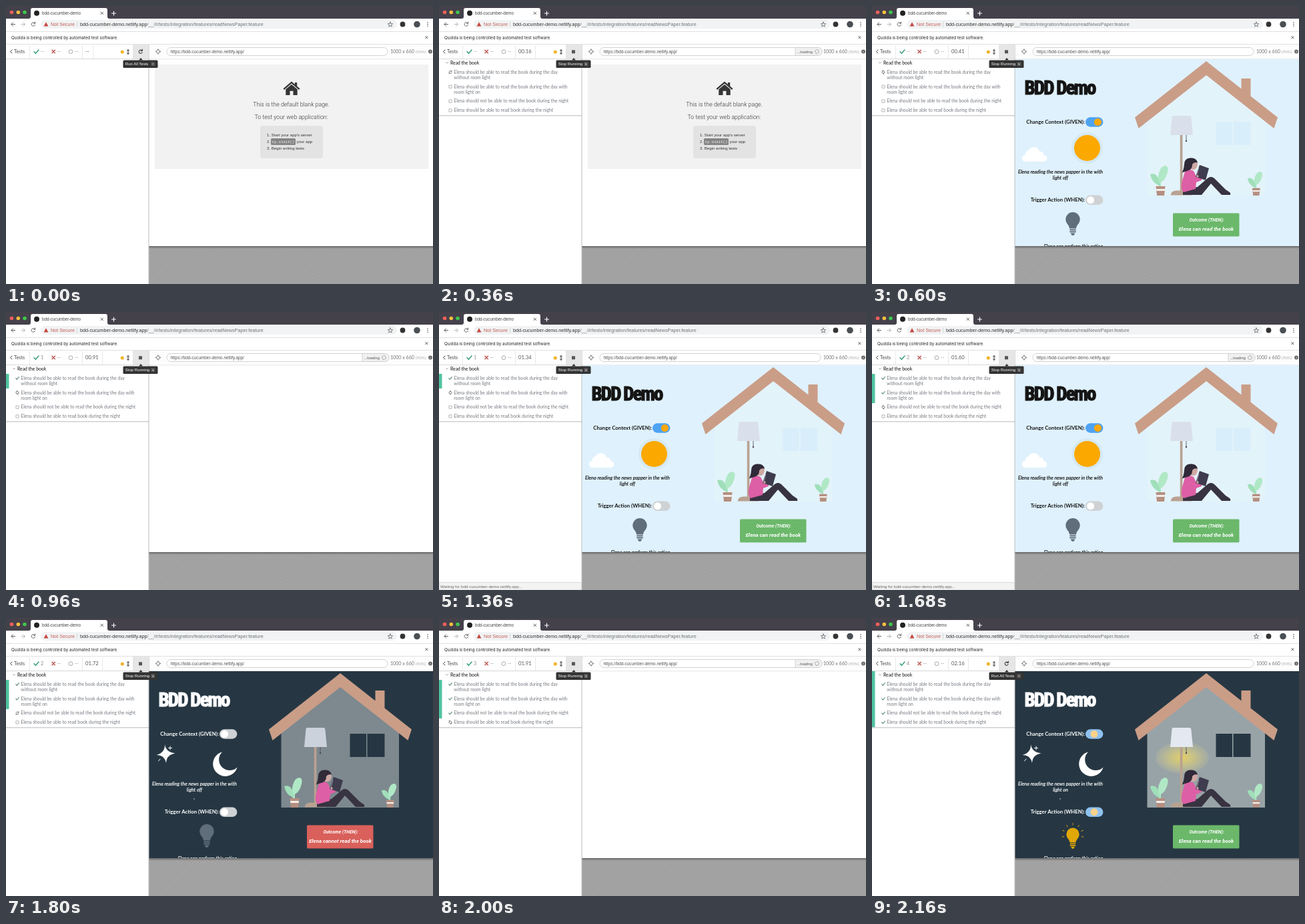
An HTML page for the animation above (2.2 s loop, 640 by 418 pixels).

```html
<!DOCTYPE html>
<html lang="en">
<head>
<meta charset="utf-8">
<title>Test run</title>
<style>
html, body { margin: 0; width: 100%; height: 100%; overflow: hidden; background: #fff; }
svg { display: block; width: 640px; height: 418px; font-family: "Liberation Sans", Arial, sans-serif; }
text { white-space: pre; }
.ui { font-family: Lato, "Open Sans", sans-serif; }
.line { fill: none; stroke-linecap: round; stroke-linejoin: round; }
.mid { text-anchor: middle; }
.hide { display: none; }

#scene { --sky: #dff1fc; --wall: #e3f3fa; --pane: #d9eefb; --ink: #151515; --bulb: #606e7b; --shade: #dae0eb; }
#scene.lit { --wall: #eef8f9; --pane: #d8effd; --bulb: #e0a806; }
#scene.night { --sky: #263743; --wall: #7d898f; --pane: #263743; --ink: #fff; --shade: #cbd2dc; }
#scene.night.lit { --wall: #98a3a7; --shade: #e4e8f0; }
#scene .glow, #scene .rays, #scene .moon { display: none; }
#scene.lit .glow, #scene.lit .rays, #scene.night .moon { display: inline; }
#scene.night .sun { display: none; }
#scene.lit .bulb { transform: translate(301px, 347px) scale(.9) translate(-301px, -345px); }
.ink { fill: var(--ink); }
.label { font: 700 7.8px Lato, "Open Sans", sans-serif; text-anchor: end; }
.note { font: italic 500 7.3px Lato, "Open Sans", sans-serif; text-anchor: middle; stroke: var(--ink); stroke-width: .12; }
.title { font-family: "Roboto Condensed", Roboto, "Open Sans", sans-serif; font-weight: 900; font-stretch: 75%; letter-spacing: -.065em; stroke: var(--ink); stroke-width: 1.2; }
.out { font-family: Roboto, "Open Sans", sans-serif; font-style: italic; font-weight: 700; fill: #fff; text-anchor: middle; }

.toggle .track { fill: #cfd2d4; }
.toggle .knob { fill: #fff; transform: translateX(327.6px); }
.toggle.on .track { fill: #4ea3f2; }
.toggle.on .knob { fill: #fba80a; transform: translateX(338.4px); }
.toggle.half .track { fill: #8fc2f0; }
.toggle.half .knob { fill: #fcd28b; transform: translateX(333px); }
</style>
</head>
<body>
<svg viewBox="0 0 640 418">
  <defs>
    <pattern id="hatch" width="4" height="4" patternUnits="userSpaceOnUse" patternTransform="rotate(45)">
      <rect width="4" height="4" fill="#a4a4a4"/><rect width="1" height="4" fill="#9d9d9d"/>
    </pattern>
    <linearGradient id="drop" x2="0" y2="1">
      <stop stop-color="#000" stop-opacity=".38"/><stop offset="1" stop-color="#000" stop-opacity="0"/>
    </linearGradient>
    <radialGradient id="light">
      <stop stop-color="#f0d65c" stop-opacity=".85"/><stop offset=".5" stop-color="#ecd96e" stop-opacity=".5"/>
      <stop offset="1" stop-color="#e9dd86" stop-opacity=".1"/>
    </radialGradient>
    <clipPath id="view"><rect x="214" y="80" width="426" height="281"/></clipPath>
    <path id="tick" class="line" d="M-2.3 .1-.7 1.8 2.4-1.8" stroke-width="1.1"/>
    <path id="spin" class="line" stroke="#666" stroke-width=".8" d="M-2-.5A2.1 2.1 0 0 1 1.8-1.1M2 .5A2.1 2.1 0 0 1-1.8 1.1M2-2.2V-.9H.8M-2 2.2V.9h1.2"/>
  </defs>
  <rect width="640" height="418" fill="#fff"/>

  <!-- browser window -->
  <rect width="640" height="19" fill="#44414b"/>
  <circle cx="8.5" cy="9.5" r="2.8" fill="#f3605a"/><circle cx="18.3" cy="9.5" r="2.8" fill="#f5bd40"/><circle cx="28" cy="9.5" r="2.8" fill="#3fc64c"/>
  <path d="M34 19q3 0 3-3V6q0-3 3-3h109q3 0 3 3v10q0 3 3 3z" fill="#fff"/>
  <circle cx="46" cy="10.8" r="4" fill="#222"/>
  <text x="54" y="13.2" font-size="6.3" fill="#444">bdd-cucumber-demo</text>
  <path class="line" d="M142 9l3.6 3.6m0-3.6-3.6 3.6" stroke="#555" stroke-width=".9"/>
  <path class="line" d="M158.5 11h6m-3-3v6" stroke="#fff" stroke-width="1.1"/>
  <g class="line" stroke="#5f6368" stroke-width="1">
    <path d="M13.5 27.5H8m2.6-2.7L8 27.5l2.6 2.7"/>
    <path d="M23 27.5h5.5m-2.6-2.7 2.6 2.7-2.6 2.7" stroke="#b9b9b9"/>
    <path d="M43.3 26a2.8 2.8 0 1 0 .2 2.5M43.6 24v2.2h-2.2"/>
  </g>
  <rect x="52" y="21" width="534" height="13" rx="6.5" fill="#f1f3f4"/>
  <path d="M60 24.3 63.4 30.5H56.6z" fill="#c5483f"/>
  <text x="67" y="30.2" font-size="7.2" fill="#c25b54">Not Secure</text>
  <path d="M106.5 23.5v8" stroke="#ccc" stroke-width=".7"/>
  <text x="111" y="30.2" font-size="7.2" fill="#333">bdd-cucumber-demo.netlify.app<tspan fill="#707478">/__/#/tests/integration/features/readNewsPaper.feature</tspan></text>
  <path class="line" d="m576 24 1 2.5 2.6.2-2 1.7.7 2.6-2.3-1.4-2.3 1.4.7-2.6-2-1.7 2.6-.2z" stroke="#5f6368" stroke-width=".8"/>
  <circle cx="594.5" cy="27.5" r="3.9" fill="#333"/>
  <circle cx="616" cy="27.5" r="4.8" fill="#4a4f54"/>
  <g fill="#555"><circle cx="632" cy="24.7" r=".8"/><circle cx="632" cy="27.5" r=".8"/><circle cx="632" cy="30.3" r=".8"/></g>
  <path d="M0 38.5h640M0 57.5h640" stroke="#dadada" stroke-width=".8"/>
  <text x="8" y="49.5" font-size="6.2" font-family="Inter, sans-serif" fill="#222">Quolda is being controlled by automated test software.</text>
  <path class="line" d="m628.8 45.6 3.2 3.2m0-3.2-3.2 3.2" stroke="#444" stroke-width=".9"/>

  <!-- address row -->
  <rect x="214" y="58" width="426" height="22" fill="#fdfdfd"/>
  <g class="line" stroke="#777" stroke-width=".8"><circle cx="228" cy="68.5" r="2.7"/><path d="M228 64.5v2m0 4v2M224 68.5h2m4 0h2"/></g>
  <rect x="241" y="62.5" width="331" height="12" rx="6" fill="#fff" stroke="#c9c9c9" stroke-width=".8"/>
  <text x="246.5" y="70.7" font-size="6.4" fill="#555">https://bdd-cucumber-demo.netlify.app/</text>
  <g id="loading">
    <path d="M534 62.5h34.5a5.8 6 0 0 1 0 12H534z" fill="#f1f1f1" stroke="#c9c9c9" stroke-width=".8"/>
    <text x="536.5" y="70.7" font-size="5.8" fill="#555">...loading</text>
    <circle id="ring" cx="566.5" cy="68.5" r="2.8" fill="none" stroke="#777" stroke-width=".9" stroke-dasharray="1.3 .9"/>
  </g>
  <text class="ui" x="576" y="71" font-size="7.1" fill="#777">1000 x 660</text>
  <text class="ui" x="614" y="71" font-size="6.2" fill="#aaa">(90%)</text>
  <circle cx="636" cy="68.5" r="2.9" fill="#666"/><path d="M636 68v2m0-3.4v.5" stroke="#fff" stroke-width=".8"/>

  <!-- page -->
  <rect x="214" y="361" width="426" height="57" fill="url(#hatch)"/>
  <rect x="214" y="361" width="426" height="4" fill="url(#drop)"/>
  <path d="M214 79.8h426" stroke="#ddd" stroke-width=".7"/>
  <g id="blank">
    <rect x="223" y="88" width="410" height="157" fill="#f2f2f2"/>
    <path d="M428 113.5l-12.5 10.7 1.5 1.7 11-9.3 11 9.3 1.5-1.7-4.3-3.7v-5.5h-3.3v2.7zM428 118l-8.7 7.2v8.8h6.2v-6.3h5v6.3h6.2v-8.8z" fill="#353535"/>
    <g class="mid" font-family="Roboto, sans-serif" font-weight="300" font-size="8.8" fill="#333">
      <text x="427.5" y="151">This is the default blank page.</text>
      <text x="427.5" y="170">To test your web application:</text>
    </g>
    <rect x="381" y="180" width="94" height="49" rx="4" fill="#e3e3e3"/>
    <g font-size="6.08" fill="#333">
      <text x="391" y="195.5">1. Start your app's server</text>
      <text x="391" y="206">2.</text><text x="435.5" y="206">your app</text>
      <text x="391" y="216.3">3. Begin writing tests</text>
    </g>
    <rect x="397" y="199" width="37" height="10" rx="1.5" fill="#858585"/>
    <text class="mid" x="415.5" y="205.8" font-family="Liberation Mono, monospace" font-size="5.6" fill="#fff">cy.visit()</text>
  </g>

  <g id="scene" clip-path="url(#view)">
    <rect x="214" y="80" width="426" height="281" fill="var(--sky)"/>
    <text id="heading" class="title ink" x="228.5" y="132.5">BDD Demo</text>
    <text class="label ink" x="319" y="177">Change Context (GIVEN):</text>
    <g class="toggle" id="given"><rect class="track" x="320" y="167.3" width="26.4" height="14.4" rx="7.2"/><circle class="knob" cy="174.5" r="5.5"/></g>
    <text class="label ink" x="319" y="294">Trigger Action (WHEN):</text>
    <g class="toggle" id="when"><rect class="track" x="320" y="284.6" width="26.4" height="14.4" rx="7.2"/><circle class="knob" cy="291.8" r="5.5"/></g>
    <g class="sun">
      <circle cx="322.5" cy="213.5" r="23.5" fill="#d5e9f3"/><circle cx="322.5" cy="213.5" r="19.5" fill="#fba800"/>
      <path d="M230 234a5 5 0 0 1-.5-10 7 7 0 0 1 5-7 9 9 0 0 1 16.5 1.5 6 6 0 0 1 6.5 5.5 5 5 0 0 1-.5 10z" fill="#fff"/>
    </g>
    <g class="moon" fill="#fff">
      <path d="M238 190q1.5 11.5 15.5 13.5-13 2-13.5 14.5-2.5-12-14.5-12 13-3.500 12.500-16z"/>
      <path class="line" d="M246 193v5m-2.500-2.500h5M231 212l-2.500 3" stroke="#fff" stroke-width="1"/>
      <path d="M324 201.500a18.500 18.500 0 1 0 22.500 23 16 16 0 0 1-22.500-23z"/>
      <circle cx="282" cy="272" r=".7"/>
    </g>
    <text class="note ink" x="282.5" y="252">Elena reading the news papper in the with</text>
    <text class="note ink" id="note" x="282.5" y="260.8"></text>
    <text class="note ink" x="302" y="363.5">Elena can perform this action</text>
    <g class="bulb" fill="var(--bulb)">
      <path d="M301 310a10.700 10.700 0 0 0-10.700 10.700c0 6.500 5.200 8 5.700 13.800h10c.5-5.800 5.700-7.300 5.700-13.800A10.700 10.700 0 0 0 301 310z"/>
      <path d="M296.300 335.500h9.400v2h-9.400zm0 3h9.400v2h-9.400zm1.700 3h6q-.5 3.500-3 3.500t-3-3.500z"/>
    </g>
    <g class="rays line" id="rays" stroke="#e0a806" stroke-width=".9"></g>

    <path d="M501 100 589 172V285H412.500V172z" fill="var(--wall)"/>
    <path d="M553.5 109h14v42l-14-11zM501 83 608 167.500 602.500 184 501 104 399.500 184 394 167.500z" fill="#ca9d87"/>
    <path d="M515.5 174h24.500v35h-24.500zm26 0h26v35h-26z" fill="var(--pane)"/>
    <ellipse class="glow" cx="465" cy="210" rx="40" ry="24" fill="url(#light)"/>
    <path d="M461.800 193h3.600v85h-3.600z" fill="#b9a191"/>
    <path d="M447.500 284.500q1-7 9-7h14q8 0 9 7z" fill="#b9a191"/>
    <path d="M471 193v10" stroke="#5b5262" stroke-width=".9"/><circle cx="471" cy="203" r="1.2" fill="#4a4252"/>
    <path d="M451 165h25q2 0 2.300 2l2.700 27h-34l2.500-27q.3-2 1.500-2z" fill="var(--shade)"/>
    <g id="plant">
      <path d="M430 271q-3-8 0-20 3-11 10-11 6 2 2 13-3 9-9 12v6z" fill="#b0e8c6"/>
      <path d="M430 270q-11-5-13-17 8-3 12 6 2 5 3 11z" fill="#a0dfba"/>
      <path d="M425.500 271h14l-1.500 14h-11z" fill="#b58f80"/><path d="M426 275h13l-.4 3h-12.200z" fill="#f4eeea"/>
    </g>
    <use href="#plant" transform="translate(212.5 56.4) scale(.84 .802)"/>

    <!-- reader -->
    <path d="M466 284v-7l22-5 15-13q5-4 10 0l17 17 6 4q2 2 1 4h-13l-16-17-14 17z" fill="#383341"/>
    <path d="M469 249q7-5 13-1l5 10 7 0v4l-8 3-1 10-18 5q-5-5-2-17z" fill="#dd5fa5"/>
    <path d="M478 235q9-4 10 2 0 7-5 9h-5z" fill="#cfa9a4"/>
    <path d="M468 238q0-9 9-9.500 9-1 11 7-6-1-8 3 0 7-6 9-3 1-9.500 3 3-5 3.500-12.500z" fill="#302a39"/>
    <path d="m491 239 14 5-5 18-15-5z" fill="#3e3c4e"/><path d="m490 243.500-3 12" stroke="#9793a6" stroke-width=".8"/>
    <circle cx="488" cy="256" r="1.700" fill="#cfa9a4"/>

    <rect id="outcome" x="451" y="311.500" width="99.500" height="35" rx="1.500"/>
    <text class="out" x="501.5" y="324" font-size="6.8">Outcome (THEN):</text>
    <text class="out" id="verdict" x="501" y="338" font-size="7.9"></text>
  </g>

  <!-- test runner panel -->
  <path d="M214 58v360" stroke="#bdbdbd" stroke-width="1"/>
  <rect y="58" width="213.500" height="21.500" fill="#fff"/>
  <rect x="190" y="58" width="24" height="21.500" fill="#e6e6e6"/>
  <path d="M0 79.600h214" stroke="#d2d2d2" stroke-width=".9"/>
  <path d="M35.500 59v20M114.500 59v20" stroke="#e2e2e2" stroke-width=".8"/>
  <path id="divider" d="M0 59v20" stroke="#e2e2e2" stroke-width=".8"/>
  <path class="line" d="M9 66l-2.500 2.500L9 71" stroke="#444" stroke-width="1"/>
  <g class="ui" font-size="7.3" fill="#8b8b8b">
    <text x="12" y="71.200" fill="#444">Tests</text>
    <use href="#tick" transform="translate(45.500 68.700) scale(1.450)" stroke="#3fa27c"/>
    <text id="passed" x="52" y="71.200"></text>
    <path class="line" d="m69 66.400 4.400 4.400m0-4.400-4.400 4.400" stroke="#c0605b" stroke-width="1.5"/>
    <text x="76.500" y="71.200">--</text>
    <circle cx="97" cy="68.700" r="2.900" fill="none" stroke="#aaa" stroke-width="1"/>
    <text x="103" y="71.200">--</text>
    <text id="clock" x="119" y="71.300" font-size="7.7" fill="#555"></text>
  </g>
  <circle cx="174.300" cy="69" r="2.600" fill="#f1b52f"/>
  <path class="line" d="M183 65.800v6.400m-1.400-5 1.400-1.600 1.400 1.600m-2.800 3.600 1.400 1.600 1.400-1.600" stroke="#333" stroke-width="1"/>
  <path id="stop" d="M199 66.300h5v5h-5z" fill="#555"/>
  <path id="rerun" class="line" d="M203.800 67a2.600 2.600 0 1 0 .3 2.800M204.400 65v2.400H202" stroke="#444" stroke-width="1.1"/>

  <g id="list">
    <rect y="164" width="214" height="2.500" fill="url(#drop)" opacity=".6"/>
    <path class="line" d="m10.600 84.700 1.400 1.400 1.400-1.400" stroke="#777" stroke-width=".7"/>
    <text class="ui" x="17" y="88" font-size="6.8" font-weight="500" fill="#222">Read the book</text>
    <g id="rows" class="ui" font-size="6.75" fill="#757a80"></g>
    <rect id="bar" width="4.500" fill="#4fc3a0"/>
  </g>

  <g id="tip">
    <path d="m202 78 3 3.500h-6z" fill="#333"/>
    <rect x="175.500" y="81.500" width="52" height="11.500" rx="1.500" fill="#333"/>
    <text id="tipText" x="178.800" y="89.400" font-size="6" fill="#fff"></text>
    <rect x="217.300" y="84.200" width="6" height="6" rx="1" fill="#555"/>
    <text id="tipKey" class="mid" x="220.300" y="88.900" font-size="4.6" fill="#fff"></text>
  </g>

  <g id="status">
    <path d="M0 406.500h211q2.500 0 2.500 2.500V418H0z" fill="#f3f3f3" stroke="#cfcfcf" stroke-width=".7"/>
    <text x="2" y="414.600" font-size="6.2" fill="#666">Waiting for bdd-cucumber-demo.netlify.app...</text>
  </g>
</svg>

<script>
const LOOP = 2200, STEP = 40;
const $ = id => document.getElementById(id);
const show = (id, on) => $(id).classList.toggle('hide', !on);
const put = (id, text) => { if ($(id).textContent !== text) $(id).textContent = text; };

// [start ms, value]
const pages = [[0, 'blank'], [600, 'day'], [800, 'white'], [1280, 'day'], [1480, 'day lit'],
  [1560, 'white'], [1640, 'day'], [1800, 'night'], [1920, 'white'], [2080, 'day'], [2160, 'night lit']];
const passes = [[0, 0], [760, 1], [1480, 2], [1840, 3], [2160, 4]];
const loads = [[0, 0], [320, 1], [560, 0], [800, 1], [1320, 0], [1520, 1], [1720, 0], [1880, 1], [2080, 0]];
const clock = [[200, 0], [600, .41], [960, .91], [1520, 1.51], [1680, 1.6], [2000, 1.91], [2160, 2.16]];
const barEnd = [93, 115, 137, 151, 164];

const tests = [
  [101.8, 'Elena should be able to read the book during the day', 'without room light'],
  [123.6, 'Elena should be able to read the book during the day with', 'room light on'],
  [145.4, 'Elena should not be able to read the book during the night'],
  [159.2, 'Elena should be able to read book during the night']
];
$('rows').innerHTML = tests.map(([y, ...lines], i) =>
  lines.map((s, n) => `<text x="22.3" y="${y + n * 8.6}">${s}</text>`).join('') +
  `<g transform="translate(17 ${y - 2.3})">
    <rect id="wait${i}" x="-2.1" y="-2.1" width="4.2" height="4.2" rx=".2" fill="none" stroke="#999" stroke-width=".7"/>
    <use id="run${i}" href="#spin"/><use id="ok${i}" href="#tick" stroke="#5b8d7d"/></g>`).join('');

$('rays').innerHTML = [-105, -70, -35, 0, 35, 70, 105].map(a =>
  `<path d="M301 311.200v-2.500" transform="rotate(${a} 301 325)"/>`).join('');

// choose the heading size that suits the available face
const heading = $('heading');
heading.style.fontSize = '20px';
heading.style.fontSize = 20 * 106 / heading.getComputedTextLength() + 'px';

const at = (steps, t) => steps.filter(s => s[0] <= t).pop()[1];

function seconds(t) {
  const i = clock.findIndex(p => p[0] >= t);
  const [t1, v1] = clock[i < 0 ? clock.length - 1 : i];
  if (i < 1) return v1;
  const [t0, v0] = clock[i - 1];
  return v0 + (v1 - v0) * (t - t0) / (t1 - t0);
}

function draw(t) {
  const page = at(pages, t), done = at(passes, t);
  const busy = t >= 40 && t < 2160, started = t >= 200;
  const lit = page.includes('lit'), night = page.includes('night');

  show('blank', page === 'blank');
  show('scene', /day|night/.test(page));
  $('scene').classList.toggle('lit', lit);
  $('scene').classList.toggle('night', night);
  $('given').setAttribute('class', 'toggle ' + (night ? lit ? 'half' : '' : 'on'));
  $('when').setAttribute('class', 'toggle ' + (night && lit ? 'half' : ''));
  put('note', lit ? 'light on' : 'light off');
  put('verdict', night && !lit ? 'Elena cannot read the book' : 'Elena can read the book');
  $('outcome').setAttribute('fill', night && !lit ? '#d9605b' : '#6bb86b');

  show('loading', at(loads, t));
  $('ring').setAttribute('transform', `rotate(${t * .6} 566.5 68.5)`);
  show('status', t >= 1240 && t < 1720);

  put('passed', done ? String(done) : '--');
  put('clock', started ? seconds(t).toFixed(2).padStart(5, '0') : '--');
  $('divider').setAttribute('transform', `translate(${started ? 144.5 : 131})`);
  show('stop', busy);
  show('rerun', !busy);
  put('tipText', busy ? 'Stop Running' : 'Run All Tests');
  put('tipKey', busy ? 's' : 'r');

  show('list', started);
  tests.forEach((_, i) => {
    show('ok' + i, i < done);
    show('run' + i, i === done);
    show('wait' + i, i > done);
    $('run' + i).setAttribute('transform', `rotate(${t * .5 % 360})`);
  });
  const top = done === 4 ? 80 : 93;
  $('bar').setAttribute('y', top);
  $('bar').setAttribute('height', barEnd[done] - top);
}

const origin = performance.now();
function tick(now) {
  const t = Math.max(0, now - origin) % LOOP;
  draw(Math.floor(t / STEP) * STEP);
  requestAnimationFrame(tick);
}
draw(0);
requestAnimationFrame(tick);
</script>
</body>
</html>
```
